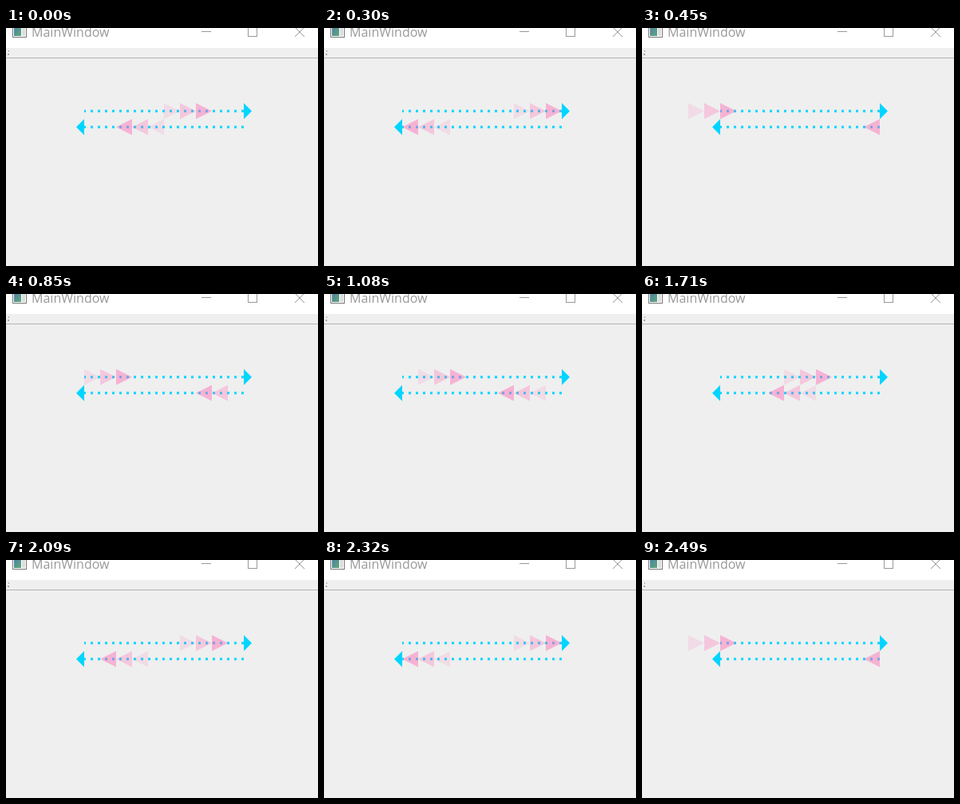
Write an HTML page that moves like this. It is 391 by 298 pixels and loops after 2.72 s.

```html
<!DOCTYPE html>
<html lang="en">
<head>
<meta charset="utf-8">
<title>Arrow flow</title>
<style>
  html, body { margin: 0; width: 100%; height: 100%; overflow: hidden; background: #efefef; }
  svg { display: block; }
  text { font: 16px "Open Sans", "Noto Sans", sans-serif; fill: #999; }
</style>
</head>
<body>
<svg width="391" height="298" viewBox="0 0 391 298">
  <defs>
    <linearGradient id="pane" x1="0" y1="0" x2="1" y2="1">
      <stop offset="0" stop-color="#4d80a8"/>
      <stop offset="1" stop-color="#5fa878"/>
    </linearGradient>
  </defs>
  <rect width="391" height="298" fill="#efefef"/>

  <!-- title bar -->
  <rect width="391" height="25" fill="#fff"/>
  <rect x="8.5" y="-4.5" width="17" height="16" fill="#fff" stroke="#777"/>
  <rect x="10" y="-2" width="9" height="12" fill="url(#pane)"/>
  <rect x="20" y="-2" width="4" height="12" fill="#ddd"/>
  <text x="32" y="11">MainWindow</text>
  <g fill="none" stroke="#999">
    <path d="M245 4.5H257"/>
    <rect x="303.5" y="-1.5" width="11" height="12"/>
    <path d="M362 -1L374 11M374 -1L362 11"/>
  </g>

  <!-- tool bar -->
  <path d="M0 37.5H391" stroke="#b4b4b4"/>
  <path d="M3 28h1v2h-1zM2 32h2v2h-2z" fill="#a5a5a5"/>

  <!-- dotted tracks -->
  <g stroke="#00d5ff" stroke-width="3" stroke-dasharray="3 6">
    <path d="M298 104H98"/>
    <path d="M298 124H98"/>
  </g>
  <path d="M298 94L308 104L298 114ZM98 114L88 124L98 134Z" fill="#00d5ff"/>

  <g id="flow" fill="#ff69b4"></g>
</svg>
<script>
const LOOP = 2720, LEFT = 98, RIGHT = 298, SIZE = 20, STEPS = 10, FIRST = 7;
const times = [0, 70, 300, 450, 680, 850, 1080, 1310, 1480, 1710, 1860, 2090, 2320, 2490];
const alphas = [0.45, 0.3, 0.15];
const flow = document.getElementById("flow");

function addArrow(alpha) {
  const el = document.createElementNS("http://www.w3.org/2000/svg", "path");
  el.setAttribute("fill-opacity", alpha);
  return flow.appendChild(el);
}
const upper = alphas.map(addArrow);
const lower = alphas.map(addArrow);

const pointRight = x => `M${x} 94L${x + SIZE} 104L${x} 114Z`;
const pointLeft = x => `M${x} 114L${x - SIZE} 124L${x} 134Z`;

function render(t) {
  const index = times.filter(start => start <= t).length - 1;
  const step = (FIRST + index) % STEPS;
  alphas.forEach((_, i) => {
    const offset = (step - i) * SIZE;
    upper[i].setAttribute("d", pointRight(LEFT + offset));
    // followers on the lower track appear only once clear of its start
    const visible = i === 0 || offset > 0;
    lower[i].setAttribute("d", visible ? pointLeft(RIGHT - offset) : "");
  });
}

const began = performance.now();
function tick() {
  render((performance.now() - began) % LOOP);
  requestAnimationFrame(tick);
}
render(0);
requestAnimationFrame(tick);
</script>
</body>
</html>
```
